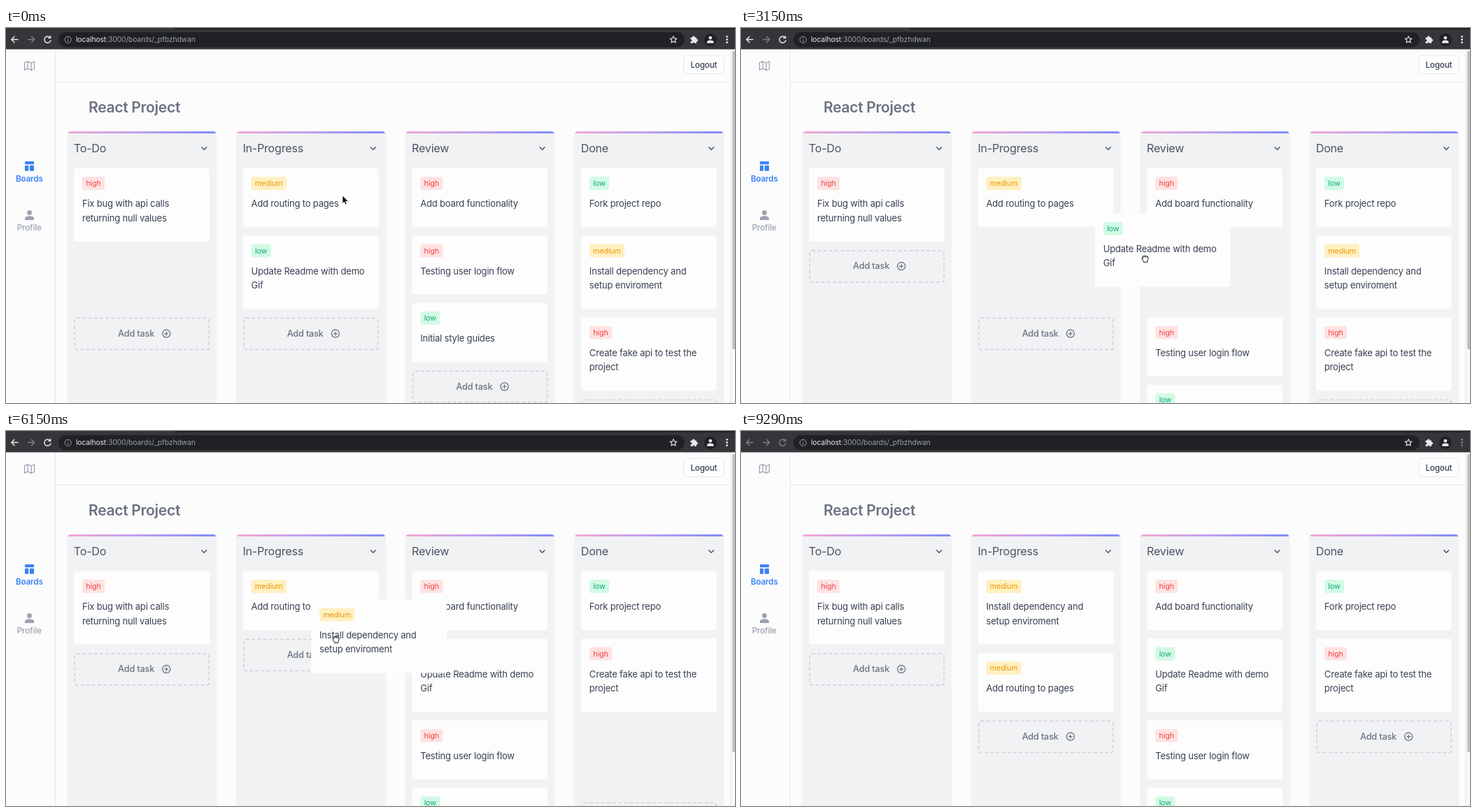
An HTML page that plays this animation: 1042 by 537 pixels, repeating every 9440 ms.

```html
<!DOCTYPE html>
<html lang="en">
<head>
<meta charset="utf-8">
<title>Task board</title>
<style>
  html, body { margin: 0; height: 100%; overflow: hidden; background: #fcfcfd; }
  svg { display: block; width: 1042px; height: 537px; }
  text { font-family: Inter, Roboto, sans-serif; letter-spacing: -.014em; white-space: pre; }
  .mid { text-anchor: middle; }
  .line { fill: none; stroke-linecap: round; stroke-linejoin: round; }
</style>
</head>
<body>
<svg id="stage" viewBox="0 0 1042 537"></svg>
<script>
const LOOP = 9440, STEP = 150;
const TOP = 200.8, GAP = 12.1, SHORT = 84.4, TALL = 105, SLOT = TALL + GAP;
const colX = i => 97.2 + 241.65 * i;

// Tag width, background and ink.
const tags = {
  high: [32, '#fee2e2', '#ef4444'],
  medium: [50, '#fef0c0', '#f0970d'],
  low: [28, '#d1fae5', '#18a871']
};

const task = (tag, ...rows) => ({ tag, rows, height: rows.length > 1 ? TALL : SHORT });
const columns = [
  { name: 'To-Do', tasks: [
    task('high', 'Fix bug with api calls', 'returning null values')] },
  { name: 'In-Progress', tasks: [
    task('medium', 'Add routing to pages'),
    task('low', 'Update Readme with demo', 'Gif')] },
  { name: 'Review', tasks: [
    task('high', 'Add board functionality'),
    task('high', 'Testing user login flow'),
    task('low', 'Initial style guides')] },
  { name: 'Done', tasks: [
    task('low', 'Fork project repo'),
    task('medium', 'Install dependency and', 'setup enviroment'),
    task('high', 'Create fake api to test the', 'project')] }
];
columns.forEach((col, i) => {
  col.end = TOP;
  col.tasks.forEach((item, n) => {
    Object.assign(item, { id: `card${i}-${n}`, x: colX(i), y: col.end });
    col.end += item.height + GAP;
  });
});
const all = columns.flatMap(col => col.tasks);
const readme = columns[1].tasks[1], install = columns[3].tasks[1];
const lifted = [readme, install];

const text = (x, y, size, fill, str, extra = '') =>
  `<text x="${x}" y="${y}" font-size="${size}" fill="${fill}" ${extra}>${str}</text>`;
const rect = (x, y, w, h, fill, extra = '') =>
  `<rect x="${x}" y="${y}" width="${w}" height="${h}" fill="${fill}" ${extra}/>`;
const dot = (x, y, r, fill, extra = '') =>
  `<circle cx="${x}" cy="${y}" r="${r}" fill="${fill}" ${extra}/>`;
const line = (d, color, width = 1.4) =>
  `<path class="line" d="${d}" stroke="${color}" stroke-width="${width}"/>`;
const person = (x, y, size, fill) =>
  `<g transform="translate(${x} ${y}) scale(${size})" fill="${fill}">` +
  dot(0, -4, 3.4, fill) + '<path d="M-6.5 6.5V4.5Q-6.5 .8 0 .8T6.5 4.5V6.5Z"/></g>';

function star(x, y, color) {
  const points = Array.from({ length: 10 }, (_, i) => {
    const a = Math.PI * (i / 5 - .5), r = i % 2 ? 2.4 : 5.2;
    return [x + r * Math.cos(a), y + r * Math.sin(a)].map(v => v.toFixed(1));
  });
  return line(`M${points.join('L')}Z`, color, 1.1);
}

function toolbar() {
  const white = '#e8eaed', dark = '#202124';
  return rect(0, 0, 1042, 30.5, '#35363a') + rect(241, 0, 801, 2, dark) +
    rect(75, 6, 895, 21.5, dark, 'rx="10.7"') +
    line('M31.5 16.5H40.5M36.5 12.3L40.7 16.5L36.5 20.7', '#7d8085') +
    '<g id="nav">' +
    line('M17 16.5H8M12 12.3L7.8 16.5L12 20.7', 'currentColor') +
    line('M63 13.6A4.6 4.6 0 1 0 64 17.6M63.6 11.6V14.4H60.6', 'currentColor') +
    [-4.2, 0, 4.2].map(d => dot(1030.5, 16.5 + d, 1.4, 'currentColor')).join('') + '</g>' +
    dot(88.7, 16.8, 4.6, 'none', 'stroke="#9aa0a6"') + line('M88.7 16.5V19M88.7 14.4V14.5', '#9aa0a6', 1.1) +
    text(100, 20.4, 10.4, white, 'localhost<tspan fill="#9aa0a6">:3000/boards/_pfbzhdwan</tspan>') +
    star(954, 16.8, white) +
    rect(978.5, 13.5, 8.5, 8.5, white, 'rx="1"') + dot(982.8, 13.3, 1.8, white) + dot(987.2, 17.6, 1.8, white) +
    dot(979, 17.8, 1.5, '#35363a') + dot(982.8, 22, 1.5, '#35363a') +
    dot(1006.8, 16.8, 9, dark) + person(1006.8, 17, .72, white);
}

function page() {
  const blue = '#3b82f6', gray = '#9ca3af', edge = '#e5e7eb';
  return rect(0, 30.5, 1042, 507, '#fcfcfd') +
    rect(70, 30.5, 1, 507, edge) + rect(71, 77, 965, 1, edge) +
    rect(1036, 30.5, 6, 507, '#f9f9f9') + rect(1035.5, 30.5, 1, 507, '#e8e8e8') +
    rect(1038, 33, 5, 427, '#c1c1c1', 'rx="2"') +
    line('M26.5 49.5L31 47.8L36 50L40.5 48V58.5L36 60.5L31 58.2L26.5 60.2ZM31 47.8V58.2M36 50V60.5', gray, 1.3) +
    rect(27, 191, 13, 4.2, blue, 'rx="1"') + rect(27, 196.7, 5.2, 8, blue, 'rx="1"') +
    rect(33.8, 196.7, 6.2, 8, blue, 'rx="1"') +
    text(33.3, 220, 11.7, blue, 'Boards', 'class="mid" font-weight="600"') +
    person(33.5, 268.5, 1, gray) +
    text(33.2, 290, 11.7, gray, 'Profile', 'class="mid" font-weight="500"') +
    rect(968.5, 39.5, 57.5, 26, '#fdfdfd', `rx="5" stroke="${edge}"`) +
    text(997.4, 57, 11.7, '#374151', 'Logout', 'class="mid" font-weight="500"') +
    text(118, 120.6, 21, '#6b7280', 'React Project', 'font-weight="600"');
}

function column({ name }, i) {
  const x = colX(i);
  return rect(x - 9.5, 148, 213, 400, '#f1f2f4', 'rx="4" filter="url(#soft)"') +
    `<path d="M${x - 8.7} 151q0 -3 4 -3h203.4q4 0 4 3z" fill="url(#bar)"/>` +
    text(x - .4, 177.8, 16.1, '#4b5563', name) +
    line(`M${x + 182.6} 170.8l3.4 3.5l3.4 -3.5`, '#4b5563', 1.5);
}

const adder = (_, i) => `<g id="add${i}">` +
  rect(1, 1, 192, 45, 'none', 'rx="3" stroke="#d1d5db" stroke-width="1.7" stroke-dasharray="5 3.2"') +
  text(62.8, 27.4, 12.7, '#6b7280', 'Add task', 'font-weight="500"') +
  dot(132, 23.2, 5.6, 'none', 'stroke="#6b7280" stroke-width="1.3"') +
  line('M129.4 23.2h5.2M132 20.6v5.2', '#6b7280', 1.2) + '</g>';

function card({ id, tag, rows, height }) {
  const [w, bg, ink] = tags[tag];
  return `<g id="${id}">` + rect(0, 0, 193.6, height, '#fdfdfd', 'rx="3"') +
    rect(11.8, 12.3, w, 18.8, bg, 'rx="3"') +
    text(11.8 + w / 2, 25.5, 10.8, ink, tag, 'class="mid"') +
    rows.map((row, n) => text(11.7, 55.4 + 20.5 * n, 13, '#374151', row)).join('') + '</g>';
}

const stage = document.getElementById('stage');
stage.innerHTML = `<defs>
  <linearGradient id="bar"><stop stop-color="#f4a8d4"/><stop offset=".5" stop-color="#bb9fef"/><stop offset="1" stop-color="#818cf8"/></linearGradient>
  <filter id="soft" x="-5%" y="-5%" width="110%" height="110%"><feDropShadow dx="0" dy="1" stdDeviation="1.2" flood-opacity=".07"/></filter>
</defs>` + page() + toolbar() + columns.map(column).join('') + columns.map(adder).join('') +
  all.filter(item => !lifted.includes(item)).map(card).join('') + lifted.map(card).join('') +
  `<path id="arrow" d="M0 0V12.6L2.8 10L4.8 14.2L6.9 13.2L5 9.2H9Z" fill="#000" stroke="#fff" stroke-width=".8"/>
  <path id="hand" d="M-4.6 -3.2Q-3.6 -5.4 -2 -4.3Q-.8 -5.8 .6 -4.5Q2 -5.4 3 -3.8Q4.9 -4 4.9 -1.8Q5 1.2 3.6 3.2V5.4H-2.4V3.8Q-5.4 1 -5.2 -.2Q-4.8 -1.4 -3.6 -.7ZM-3.6 -.7L-4.4 -2.8M-2 -4.3V-2.2M.6 -4.5V-2.2M3 -3.8V-2"
    fill="#fff" stroke="#111" stroke-width="1.1" stroke-linejoin="round"/>`;

// Key points: step of 150 ms, x, y, and the power that eases the way there.
const pointer = [
  [0, 481, 240], [3, 697, 337], [4, 697, 337], [6, 686, 344], [9, 686, 344], [11, 832, 383],
  [16, 376, 325, 3.8], [25, 739, 335], [28, 932, 345], [30, 885, 337], [37, 885, 337],
  [42, 325, 285, 1.36], [45, 434, 269], [50, 555, 298], [54, 997, 521], [57, 590, 325]
];
const readmePath = [
  [17, readme.x, readme.y], [20, 470, 264], [23, 578, 268], [25, colX(2), readme.y, .5]
];
const installPath = [
  [37, install.x, install.y], [41, 436.3, 241.4, 1.5], [42, 274, 232], [45, 332.5, 225], [48, colX(1), TOP, .5]
];

function along(points, k) {
  const next = points.findIndex(p => p[0] > k);
  if (next < 1) return points.at(next).slice(1, 3);
  const [k0, x0, y0] = points[next - 1], [k1, x1, y1, power = 1] = points[next];
  const f = ((k - k0) / (k1 - k0)) ** power;
  return [x0 + (x1 - x0) * f, y0 + (y1 - y0) * f];
}

// Neighbours make or close room for a card: fast at first, then settling.
const slide = (k, start) => SLOT * (1 - (1 - Math.min(1, Math.max(0, (k - start) / 2))) ** 3);
const place = (id, x, y, scale = 1) =>
  document.getElementById(id).setAttribute('transform', `translate(${x} ${y}) scale(${scale})`);
const show = (id, on) => { document.getElementById(id).style.display = on ? '' : 'none'; };

function draw(time) {
  const t = time % LOOP;
  const k = Math.floor((t + (t > 8400 ? 10 : 0)) / STEP);

  const push = slide(k, 19);
  const shifts = [[0], [slide(k, 41)], [0, push, push], [0, 0, -slide(k, 38)]];
  columns.forEach((col, i) => col.tasks.forEach((item, n) => {
    if (!lifted.includes(item)) place(item.id, item.x, item.y + shifts[i][n]);
  }));
  place(readme.id, ...along(readmePath, k));
  place(install.id, ...along(installPath, k));

  const room = [k < 1 ? SHORT + GAP : 0, k < 26 || k > 41 ? 0 : -SLOT, push, k < 48 ? 0 : -SLOT];
  columns.forEach((col, i) => place(`add${i}`, colX(i), col.end + room[i]));

  const focused = k < 62;
  const gripping = k >= 5 && k < 23 || k >= 27 && k < 46;
  const at = along(pointer, k);
  place('arrow', ...at, .9);
  place('hand', ...at, .88);
  show('hand', gripping);
  show('arrow', focused && !gripping);
  document.getElementById('nav').setAttribute('color', focused ? '#e8eaed' : '#7d8085');
}

const start = performance.now();
function tick() {
  draw(performance.now() - start);
  requestAnimationFrame(tick);
}
tick();
</script>
</body>
</html>
```
